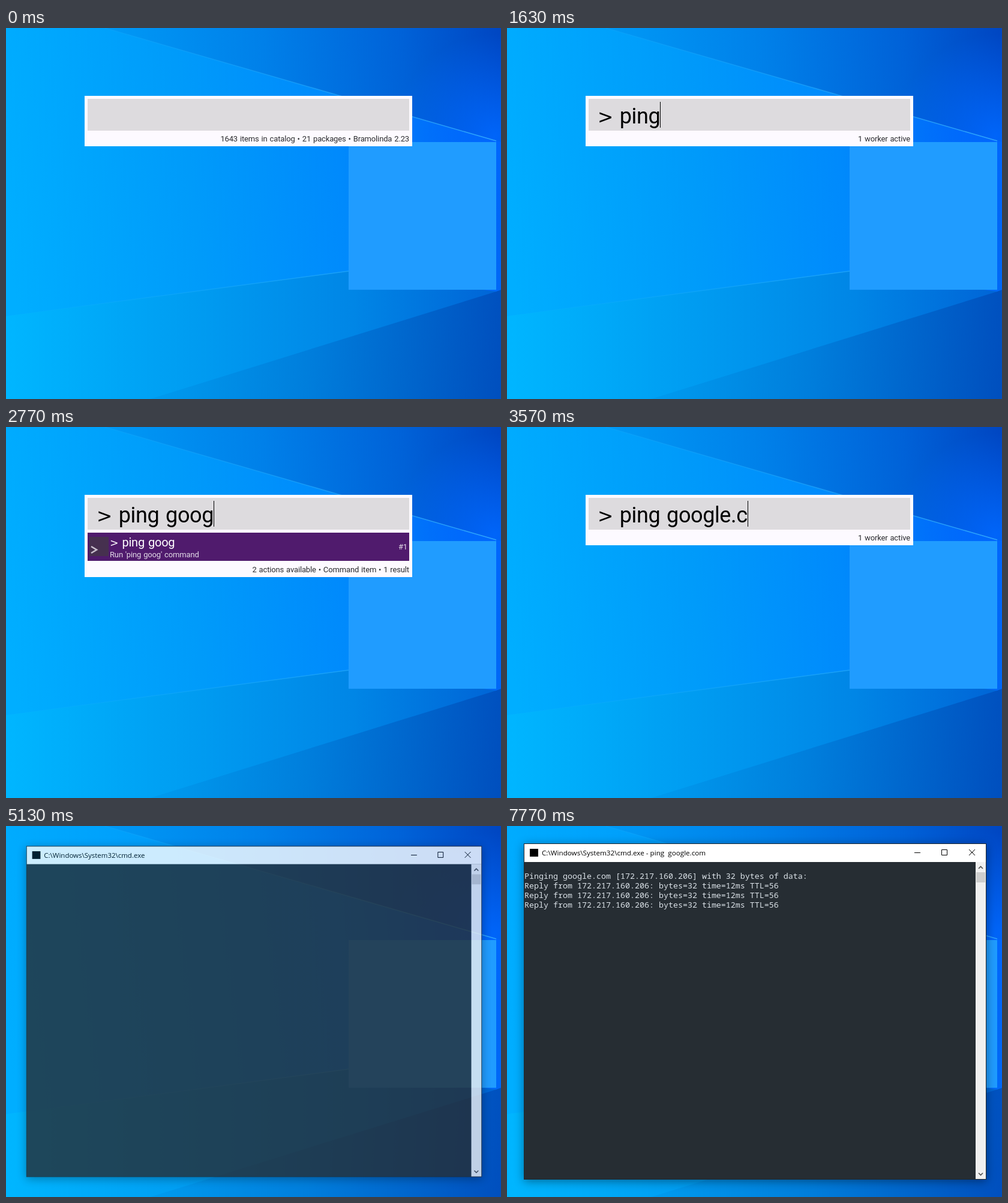
An HTML page for the animation above (8000 ms loop, 825 by 618 pixels).

```html
<!DOCTYPE html>
<html lang="en">
<head>
<meta charset="utf-8">
<title>Launcher running a ping command</title>
<style>
  html, body { margin: 0; width: 100%; height: 100%; overflow: hidden; background: #0090f4; }
  svg { display: block; width: 825px; height: 618px; }
  text { white-space: pre; }
  #launcher text { font-family: Roboto, "Noto Sans", sans-serif; letter-spacing: -.011em; word-spacing: .065em; }
  .angle { font-family: "DejaVu Sans", sans-serif; font-size: .87em; }
  .query { font-size: 36px; }
  .name { font-size: 20px; }
  .small { font-size: 13px; fill: #2b2b2f; }
  .picked .name { fill: #fff; }
  .picked .small { fill: #e3dbe8; }
  .end { text-anchor: end; }
  #console { filter: drop-shadow(0 3px 8px rgba(0, 0, 0, .4)); transform-origin: 414px 309px; }
  #title { font: 11.66px "Open Sans", "Noto Sans", sans-serif; }
  #output text { font: 13.333px "Noto Sans Mono", "DejaVu Sans Mono", monospace; fill: #dbe2e8; }
</style>
</head>
<body>
<svg viewBox="0 0 825 618">
  <defs>
    <linearGradient id="beam" gradientUnits="userSpaceOnUse" x1="0" y1="340" x2="825" y2="240">
      <stop offset="0" stop-color="#00aeff"/><stop offset=".38" stop-color="#009bfa"/>
      <stop offset=".68" stop-color="#008afc"/><stop offset="1" stop-color="#0064f6"/>
    </linearGradient>
    <linearGradient id="sky" gradientUnits="userSpaceOnUse" x1="165" y1="60" x2="825" y2="20">
      <stop offset="0" stop-color="#009af6"/><stop offset=".4" stop-color="#0080e9"/>
      <stop offset=".75" stop-color="#0062d8"/><stop offset="1" stop-color="#0046c2"/>
    </linearGradient>
    <linearGradient id="floor" gradientUnits="userSpaceOnUse" x1="0" y1="520" x2="825" y2="520">
      <stop offset="0" stop-color="#00b6ff"/><stop offset=".38" stop-color="#009cf1"/>
      <stop offset=".7" stop-color="#0086e6"/><stop offset="1" stop-color="#0064d6"/>
    </linearGradient>
    <linearGradient id="dusk" gradientUnits="userSpaceOnUse" x1="240" y1="560" x2="825" y2="600">
      <stop offset="0" stop-color="#009cef"/><stop offset=".45" stop-color="#007edc"/>
      <stop offset="1" stop-color="#004fbe"/>
    </linearGradient>
    <radialGradient id="glow" gradientUnits="userSpaceOnUse" cx="815" cy="180" r="170">
      <stop offset="0" stop-color="#0068ff" stop-opacity=".9"/>
      <stop offset="1" stop-color="#0068ff" stop-opacity="0"/>
    </radialGradient>
    <linearGradient id="ray" gradientUnits="userSpaceOnUse" x1="0" y1="0" x2="817" y2="0">
      <stop offset="0" stop-color="#22b4ff" stop-opacity="0"/>
      <stop offset="1" stop-color="#3cb8ff" stop-opacity=".75"/>
    </linearGradient>
  </defs>

  <g id="wallpaper">
    <path fill="url(#beam)" d="M0 0H825V618H0Z"/>
    <path fill="url(#sky)" d="M165 0H825V190L817 188Z"/>
    <path fill="url(#glow)" d="M600 0H825V360H600Z"/>
    <path fill="url(#floor)" d="M0 480L571 405L817 439L825 437V618H0Z"/>
    <path fill="url(#dusk)" d="M240 618L817 439L825 436V618Z"/>
    <path fill="none" stroke="url(#ray)" stroke-width="1.5" d="M165 0L817 188M0 480L571 405"/>
    <rect x="571" y="190" width="246" height="246" fill="#209cff"/>
  </g>

  <g id="launcher"></g>

  <g id="console">
    <path fill="#20282e" d="M28 29H799V589H28Z"/>
    <path fill="#fff" d="M29 30H798V60H29Z"/>
    <path fill="#262d33" d="M29 60H781V588H29Z"/>
    <path fill="#f0f0f0" d="M781 60H798V588H781Z"/>
    <path fill="#cdcdcd" d="M782 77H797V94H782Z"/>
    <rect x="38" y="38" width="14" height="13" fill="#000"/>
    <text id="title" x="58" y="49"></text>
    <g fill="none" stroke="#000">
      <path d="M679 44.5H689M724.5 39.5H733.5V48.5H724.5Z"/>
      <path d="M770 39L780 49M780 39L770 49"/>
      <path stroke="#505050" stroke-width="1.6" d="M786 71L789.5 67.5L793 71M786 578L789.5 581.5L793 578"/>
    </g>
    <g id="output"></g>
    <rect id="cursor" x="29" width="8" height="4" fill="#dbe2e8"/>
  </g>
</svg>

<script>
const LOOP = 8000;
const $ = id => document.getElementById(id);
const launcher = $('launcher'), consoleBox = $('console');

// Catalogue entries: name, path, icon
const bin = (file) => [file, 'F:\\laragon\\bin\\putty\\' + file, square('#4c66c4')];
const app = (name, path, icon) => [name, 'Start Menu: Programs\\' + path, icon];
const apps = {
  zip: app('PeaZip', 'PeaZip', square('#84ad3c')),
  photo: app('Pivora', 'Pexels', square('#000')),
  api: app('Paldore', 'Postman', '<circle cx="16" cy="16" r="16" fill="#c47a3a"/>'),
  ping: ['PING.EXE', 'C:\\Windows\\system32\\PING.EXE',
    '<path fill="#f4f4f4" stroke="#8c9499" d="M2.5 6.5H29.5V26.5H2.5Z"/>' +
    '<path fill="#b9c3c9" d="M3 7H29V10H3Z"/><path fill="#0a6fd6" d="M9 12H22V24H9Z"/>' +
    '<path stroke="#a8b0b5" d="M4 13.5H7M4 17.5H7M4 21.5H7M24 13.5H28M24 17.5H28M24 21.5H28"/>'],
  pscp: bin('PSCP.EXE'), plink: bin('PLINK.EXE'), psftp: bin('PSFTP.EXE'), putty: bin('PUTTY.EXE')
};
const prompt = '<path fill="#46304f" d="M0 0H32V32H0Z"/>' +
  '<path fill="none" stroke="#c9c0cd" stroke-width="2.6" d="M3 16L12 21.5L3 27"/>';

const CATALOG = '1643 items in catalog • 21 packages • Bramolinda 2.23';
const BUSY = '1 worker active', BUSIER = '2 workers active';
const ACTIONS = '2 actions available • Command item • ';

// Launcher steps: time, query, status line, matching entries (absent while collapsed)
const steps = [
  [0, '', CATALOG],
  [170, '>', CATALOG],
  [300, '>', BUSY],
  [570, '> ', BUSIER],
  [1000, '> p', '50 results out of 136 matches', Object.keys(apps)],
  [1200, '> pi', BUSY],
  [1300, '> pi', '4 results', ['zip', 'ping', 'plink']],
  [1400, '> pin', BUSY],
  [1530, '> pin', '3 results', ['ping', 'plink']],
  [1630, '> ping', BUSY],
  [1730, '> ping', '2 results', ['ping']],
  [2200, '> ping ', BUSY],
  [2270, '> ping ', '2 results', ['ping']],
  [2430, '> ping g', BUSY],
  [2500, '> ping g', '1 result', []],
  [2530, '> ping go', BUSY],
  [2600, '> ping goo', BUSY],
  [2670, '> ping goo', '1 result', []],
  [2700, '> ping goog', BUSY],
  [2770, '> ping goog', '1 result', []],
  [2900, '> ping googl', BUSY],
  [3000, '> ping google', BUSY],
  [3070, '> ping google', '1 result', []],
  [3270, '> ping google.', BUSY],
  [3330, '> ping google.', '1 result', []],
  [3570, '> ping google.c', BUSY],
  [3630, '> ping google.c', '1 result', []],
  [3700, '> ping google.co', BUSY],
  [3770, '> ping google.com', BUSY],
  [3830, '> ping google.com', '1 result', []]
];
const FADE = 4370, HIDDEN = 4500;

const shell = 'C:\\Windows\\System32\\cmd.exe';
const reply = 'Reply from 172.217.160.206: bytes=32 time=12ms TTL=56';
const lines = [
  [5600, 'Pinging google.com [172.217.160.206] with 32 bytes of data:'],
  [5700, reply], [6700, reply], [7770, reply]
];
// Cursor blinks: from, to, row
const blinks = [[5430, 5600, 0], [6470, 6700, 3], [6770, 7500, 4]];
// Window opening: time, scale, opacity
const opening = [[5030, .94, .35], [5130, .985, .8], [5230, 1, 1]];

function square(color) {
  return `<rect width="32" height="32" rx="3" fill="${color}"/>`;
}

function text(x, y, cls, str) {
  const body = str.replace('>', '<tspan class="angle">&gt;</tspan>');
  return `<text x="${x}" y="${y}" class="${cls}">${body}</text>`;
}

function row([name, path, icon], i) {
  const y = 176 + 47 * i;
  return `<g class="${i ? '' : 'picked'}">` +
    (i ? '' : `<rect x="136" y="${y}" width="536" height="47" fill="#501b6d"/>`) +
    `<g transform="translate(139 ${y + 7})">${icon}</g>` +
    text(173, y + 23, 'name', name) + text(173, y + 41, 'small', path) +
    text(669, y + 28, 'small end', '#' + (i + 1)) + '</g>';
}

function drawLauncher([, query, status, found]) {
  const command = query.slice(2);
  const hint = command.length > 1 ? `Run '${command}' command` : '';
  const rows = found ? [[query, hint, prompt], ...found.map(key => apps[key])] : [];
  const height = found ? 90 + 47 * rows.length : 84;
  launcher.innerHTML =
    `<rect x="131" y="113" width="546" height="${height}" fill="#fdfaff"/>` +
    '<rect x="136" y="118" width="536" height="53" fill="#dddbde"/>' +
    text(151, 159, 'query', query) + rows.map(row).join('') +
    text(672, 105 + height, 'small end', (found ? ACTIONS : '') + status);
  if (query) {
    const x = Math.round(151 + launcher.querySelector('.query').getComputedTextLength());
    launcher.insertAdjacentHTML('beforeend', `<rect x="${x}" y="123" width="1" height="43"/>`);
  }
}

function drawConsole(t) {
  const [, scale, opacity] = latest(opening, t);
  consoleBox.style.transform = `scale(${scale})`;
  consoleBox.style.opacity = opacity;
  const shown = lines.filter(([at]) => t >= at);
  $('title').textContent = shell + (shown.length ? ' - ping  google.com' : '');
  if ($('output').childElementCount !== shown.length) {
    $('output').innerHTML = shown.map(([, str], i) => text(29, 88 + 16 * i, '', str)).join('');
  }
  const blink = blinks.find(([from, to]) => t >= from && t < to);
  $('cursor').style.display = blink ? '' : 'none';
  if (blink) $('cursor').setAttribute('y', 72 + 16 * blink[2]);
}

function latest(table, t) {
  return table.filter(([at]) => t >= at).pop();
}

let current;
function render(t) {
  launcher.style.display = t < HIDDEN ? '' : 'none';
  launcher.style.opacity = t < FADE ? 1 : .5;
  const step = latest(steps, t);
  if (step !== current && t < HIDDEN) drawLauncher(current = step);
  const open = t >= opening[0][0];
  consoleBox.style.display = open ? '' : 'none';
  if (open) drawConsole(t);
}

const start = performance.now();
function tick() {
  render((performance.now() - start) % LOOP);
  requestAnimationFrame(tick);
}
tick();
</script>
</body>
</html>
```
